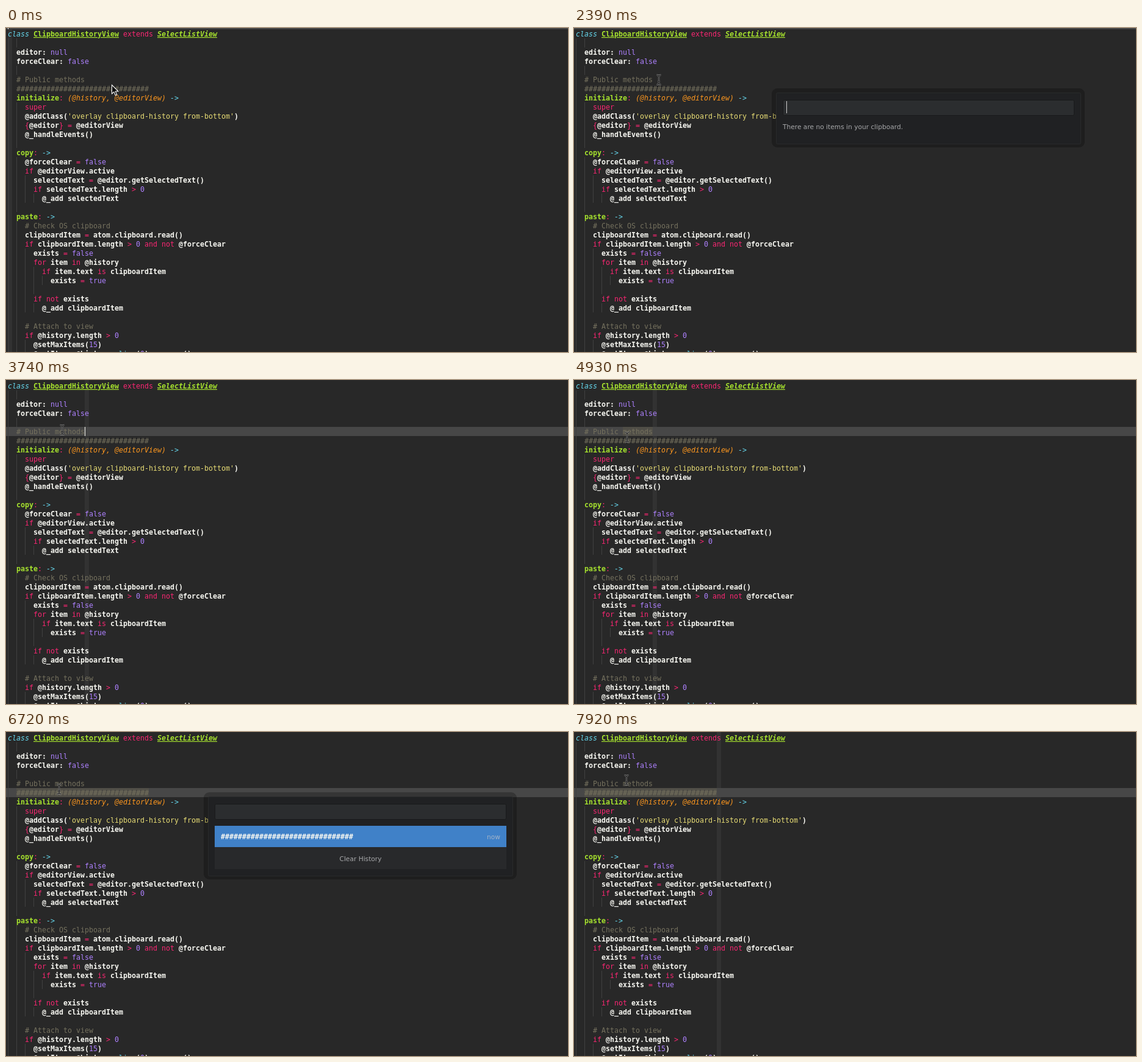
These frames come from a looping animation (921x532 px, 8000 ms). An HTML page:

```html
<!DOCTYPE html>
<html lang="en">
<head>
<meta charset="utf-8">
<title>Clipboard history</title>
<style>
  html, body { margin: 0; width: 100%; height: 100%; overflow: hidden; background: #282828; }
  svg { display: block; width: 921px; height: 532px; }
  text { white-space: pre; }
  .code { font: 11.63px "DejaVu Sans Mono", monospace; }
  .plain { fill: #f8f8f2; font-weight: bold; }
  .comment { fill: #75715e; }
  .string { fill: #e6db74; }
  .params { fill: #fd971f; font-style: italic; }
  .arrow, .storage { fill: #66d9ef; font-style: italic; }
  .support { fill: #66d9ef; }
  .method { fill: #a6e22e; font-weight: bold; }
  .type { fill: #a6e22e; font-weight: bold; text-decoration: underline; }
  .parent { fill: #a6e22e; font-weight: bold; font-style: italic; text-decoration: underline; }
  .constant { fill: #ae81ff; }
  .operator { fill: #f92672; }
  .ui { font: 10.65px "DejaVu Sans", sans-serif; fill: #a8a9ab; }
</style>
</head>
<body>
<svg id="stage" viewBox="0 0 921 532" xmlns="http://www.w3.org/2000/svg">
  <rect width="921" height="532" fill="#282828"/>
  <rect id="band" width="7" height="532" fill="#323232"/>
  <rect id="line" width="921" height="15" fill="#474747"/>
  <rect id="selection" height="15" fill="#504e47"/>
  <g id="guides" fill="#414141"></g>
  <g id="code" class="code"></g>
  <rect id="caret" width="1" height="15" fill="#f8f8f0"/>

  <g id="popup">
    <rect id="frame" x="324" y="99" width="513" rx="9" fill="#000" fill-opacity=".26"/>
    <rect id="panel" x="331.5" y="106.5" width="499" rx="2" fill="#202123" stroke="#292a2b"/>
    <rect x="342.5" y="118.5" width="477" height="25" rx="2" fill="#2b2d2f" stroke="#191a1b"/>
    <rect id="inputCaret" x="348" y="120" width="1" height="20" fill="#d0d0d0"/>
    <text id="empty" class="ui" x="342" y="166">There are no items in your clipboard.</text>
    <g id="list">
      <rect x="342" y="154" width="478" height="35" fill="#4081c8"/>
      <text id="entry" class="code plain" x="352" y="176"></text>
      <text class="ui" x="810" y="176" text-anchor="end" style="fill:#a3b4c8">now</text>
      <rect x="342" y="189" width="478" height="36" fill="#28292b"/>
      <text class="ui" x="581" y="212" text-anchor="middle">Clear History</text>
    </g>
  </g>

  <path id="pointer" d="M0 0V14.5L3.4 11.4 5.8 17 8.2 16 5.8 10.5H10.4Z" fill="#000" stroke="#fff" stroke-width="1.1"/>
  <g id="beam" fill="none">
    <path id="beamHalo" stroke="#a0a0a0" stroke-width="2.4" stroke-opacity=".75"/>
    <path id="beamCore" stroke="#141414" stroke-width="1"/>
  </g>
</svg>
<script>
const LOOP = 8000, CELL = 7, ROW = 15, LEFT = 3, TOP = 2;
const HASHES = '#'.repeat(31);
const SOURCE = `class ClipboardHistoryView extends SelectListView
    
  editor: null
  forceClear: false
    
  # Public methods
  ${HASHES}
  initialize: (@history, @editorView) ->
    super
    @addClass('overlay clipboard-history from-bottom')
    {@editor} = @editorView
    @_handleEvents()
    
  copy: ->
    @forceClear = false
    if @editorView.active
      selectedText = @editor.getSelectedText()
      if selectedText.length > 0
        @_add selectedText
    
  paste: ->
    # Check OS clipboard
    clipboardItem = atom.clipboard.read()
    if clipboardItem.length > 0 and not @forceClear
      exists = false
      for item in @history
        if item.text is clipboardItem
          exists = true
        
      if not exists
        @_add clipboardItem
    
    # Attach to view
    if @history.length > 0
      @setMaxItems(15)
      @setItems @history.slice(0).reverse()`;

const TOKENS = new RegExp([
  '(?<comment>#.*)',
  "(?<string>'[^']*')",
  '(?<params>\\(@history, @editorView\\))',
  '(?<arrow>->)',
  '(?<storage>\\bclass\\b)',
  '(?<type>\\bClipboardHistoryView\\b)',
  '(?<parent>\\bSelectListView\\b)',
  '(?<method>\\b(?:initialize|copy|paste)(?=:))',
  '(?<support>\\bslice\\b)',
  '(?<constant>\\b(?:null|true|false|\\d+)\\b)',
  '(?<operator>\\b(?:extends|super|if|for|in|is|and|not)\\b|[{}=>]|(?<=initialize|copy|paste):)'
].join('|'), 'g');

const $ = id => document.getElementById(id);
const colX = col => LEFT + col * CELL;
const rowY = row => TOP + row * ROW;

function add(parent, tag, attrs, text = '') {
  const el = document.createElementNS('http://www.w3.org/2000/svg', tag);
  set(el, attrs);
  el.textContent = text;
  parent.append(el);
}

function set(el, attrs) {
  for (const key in attrs) el.setAttribute(key, attrs[key]);
}

function show(el, visible) {
  el.setAttribute('visibility', visible ? 'inherit' : 'hidden');
}

function drawToken(kind, text, col, row) {
  const indent = text.search(/\S/);
  if (indent < 0) return;
  add($('code'), 'text', { class: kind, x: colX(col + indent), y: rowY(row) + 12 }, text.trim());
}

SOURCE.split('\n').forEach((line, row) => {
  const indent = line.match(/^ */)[0].length;
  for (let col = 0; col < indent; col += 2)
    add($('guides'), 'rect', { x: colX(col), y: rowY(row), width: 1, height: ROW });

  let end = 0;
  for (const match of line.matchAll(TOKENS)) {
    drawToken('plain', line.slice(end, match.index), end, row);
    const kind = Object.keys(match.groups).find(name => match.groups[name]);
    drawToken(kind, match[0], match.index, row);
    end = match.index + match[0].length;
  }
  drawToken('plain', line.slice(end), end, row);
});

$('entry').textContent = HASHES;
for (const id of ['beamHalo', 'beamCore'])
  set($(id), { d: 'M-3.5-8Q0-8 0-5.5V5.5Q0 8-3.5 8M3.5-8Q0-8 0-5.5M3.5 8Q0 8 0 5.5M-2 3H2' });

// Each step changes only the listed parts of the state.
const STEPS = [
  [0, { mouse: [173.5, 93.5], arrow: true, row: -1, col: 0, from: null, caret: true, popup: '', blink: false }],
  [900, { mouse: [152, 94], arrow: false }],
  [1050, { mouse: [143, 92] }],
  [1350, { mouse: [139, 85] }],
  [1800, { caret: false }],
  [2090, { caret: true }],
  [2390, { popup: 'empty', blink: true, caret: false }],
  [2540, { blink: false }],
  [2990, { blink: true }],
  [3440, { blink: false }],
  [3590, { popup: '', row: 5, col: 18, caret: true, mouse: [117, 85] }],
  [3740, { mouse: [92, 82] }],
  [3890, { mouse: [92, 81] }],
  [4040, { caret: false }],
  [4340, { col: 13, caret: true }],
  [4490, { col: 18, from: 11, caret: false }],
  [4780, { mouse: [92, 84] }],
  [4930, { mouse: [87, 94] }],
  [5380, { row: 6, col: 12, from: null, caret: true }],
  [5520, { col: 33, from: 2, caret: false }],
  [6720, { popup: 'list', blink: false }],
  [7020, { blink: true }],
  [7320, { blink: false }],
  [7770, { popup: '' }],
  [7920, { mouse: [86, 79] }]
];

function stateAt(time) {
  return Object.assign({}, ...STEPS.filter(step => step[0] <= time).map(step => step[1]));
}

function render(time) {
  const s = stateAt(time), x = colX(s.col), y = rowY(s.row);
  set($('band'), { x });
  show($('band'), !s.popup);
  set($('line'), { y });
  set($('caret'), { x, y });
  show($('caret'), s.caret);

  show($('selection'), s.from !== null);
  if (s.from !== null)
    set($('selection'), { x: colX(s.from), y, width: (s.col - s.from) * CELL });

  show($('popup'), s.popup);
  show($('empty'), s.popup === 'empty');
  show($('list'), s.popup === 'list');
  show($('inputCaret'), s.blink);
  const height = s.popup === 'list' ? 143 : 97;
  set($('frame'), { height });
  set($('panel'), { height: height - 13 });

  const place = `translate(${s.mouse})`;
  set($('pointer'), { transform: place });
  set($('beam'), { transform: place });
  show($('pointer'), s.arrow);
  show($('beam'), !s.arrow);
}

const start = performance.now();
function tick() {
  render((performance.now() - start) % LOOP);
  requestAnimationFrame(tick);
}
tick();
</script>
</body>
</html>
```
